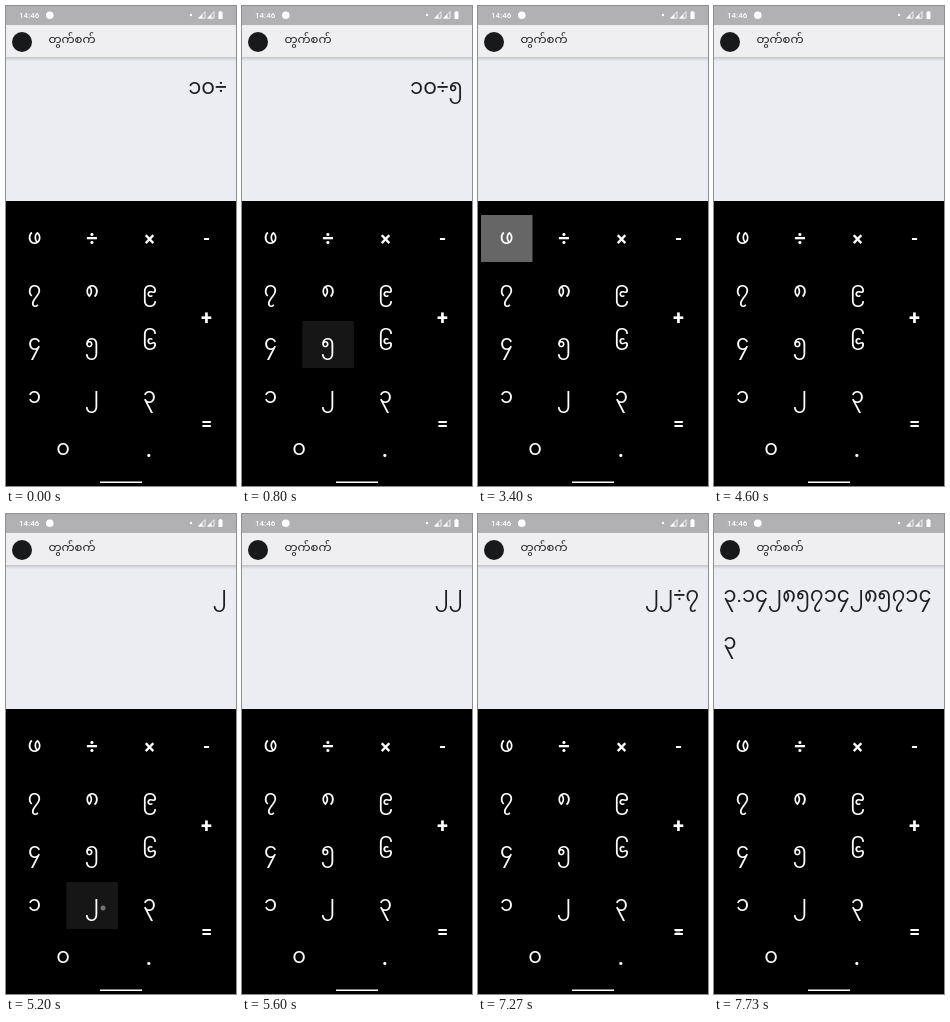
An HTML page with a canvas that plays this animation: 230x480 px, repeating every 8 s.

```html
<!DOCTYPE html>
<html lang="my">
<head>
<meta charset="utf-8">
<title>တွက်စက်</title>
<style>
html, body { margin: 0; width: 100%; height: 100%; overflow: hidden; background: #000; }
canvas { display: block; width: 230px; height: 480px; }
</style>
</head>
<body>
<canvas></canvas>
<script>
const LOOP = 8000, RATE = 15;
const FONTS = 'Roboto, "Noto Sans Myanmar", "Noto Sans", sans-serif';
const INK = '#1d1e21';
const TITLE = 'တွက်စက်', RESULT = '၃.၁၄၂၈၅၇၁၄၂၈၅၇၁၄';
const canvas = document.querySelector('canvas');
const ctx = canvas.getContext('2d');
const dpr = window.devicePixelRatio || 1;
canvas.width = 230 * dpr;
canvas.height = 480 * dpr;

function sizeFor(text, width) {
  ctx.font = `100px ${FONTS}`;
  return 100 * width / ctx.measureText(text).width;
}
// The longest result fills one line; the keys share its size.
const digitSize = sizeFor(RESULT, 208);
const titleSize = sizeFor(TITLE, 47);

function label(text, x, y, size, weight, color, align = 'center') {
  ctx.font = `${weight} ${size}px ${FONTS}`;
  ctx.textAlign = align;
  ctx.fillStyle = color;
  ctx.fillText(text, x, y);
}

// label, centre, baseline
const numerals = [
  ['ဖ', 28.5, 238], ['၇', 28.5, 291], ['၈', 86, 291], ['၉', 143.5, 291],
  ['၄', 28.5, 344], ['၅', 86, 344], ['၆', 143.5, 344],
  ['၁', 28.5, 396.5], ['၂', 86, 396.5], ['၃', 143.5, 396.5], ['၀', 57, 449]
];
// label, centre, baseline, weight
const operators = [
  ['÷', 86, 239, 700], ['×', 143.5, 239.5, 700], ['-', 200.5, 239, 500],
  ['+', 200.5, 318.3, 700], ['=', 200.5, 424.5, 500], ['.', 143, 451, 700]
];

const box = (col, row, height = 47) => [3 + 57.4 * col, 209 + 53 * row, 51.5, height];
const tap = [2.5, 40];
// start tick, button, touch point, radius per tick while held
const presses = [
  [9, box(1, 2), [88, 340], tap],
  [23, box(3, 3, 99), [200, 418], tap],
  [50, box(0, 0), [31, 234], tap],
  [75, box(1, 3), [95, 394], tap],
  [78, box(1, 3), [97, 394], tap],
  [85, box(1, 0), [88, 233], tap],
  [94, box(0, 1), [43, 285], [2.5, 14, 27, 37]],
  [109, box(3, 3, 99), [200, 418], tap]
];
const fade = [0.25, 0.087, 0.03];

const screens = [
  [0, '၁၀÷'], [10, '၁၀÷၅'], [24, '၂.၀'], [51, ''], [76, '၂'], [80, '၂၂'],
  [86, '၂၂÷'], [97, '၂၂÷၇'], [110, RESULT + '\n၃']
];

function readout(text) {
  const lines = text.split('\n');
  const [x, align] = lines.length > 1 ? [9.5, 'left'] : [221, 'right'];
  lines.forEach((line, row) => label(line, x, 88 + 46.5 * row, digitSize, 400, INK, align));
}

function ripple(tick, [start, rect, [x, y], radii]) {
  const age = tick - start, late = age - radii.length;
  if (age < 0 || late >= fade.length) return;
  ctx.save();
  ctx.beginPath();
  ctx.rect(...rect);
  ctx.clip();
  disc(`rgba(255,255,255,${late < 0 ? 0.4 : fade[late]})`, x, y, late < 0 ? radii[age] : 120);
  ctx.restore();
}

function fillRect(color, x, y, w, h) {
  ctx.fillStyle = color;
  ctx.fillRect(x, y, w, h);
}

function disc(color, x, y, r) {
  ctx.fillStyle = color;
  ctx.beginPath();
  ctx.arc(x, y, r, 0, 7);
  ctx.fill();
}

function signal(x) {
  ctx.lineWidth = 0.8;
  ctx.strokeStyle = ctx.fillStyle = '#fff';
  ctx.stroke(new Path2D(`M${x} 12.2h6.5v-6.5z`));
  ctx.fill(new Path2D(`M${x} 12.2h4v-4z`));
}

function header() {
  fillRect('#ecedf2', 0, 19, 230, 176);
  fillRect('#b1b1b4', 0, 0, 230, 19);
  label('14:46', 13, 12.2, 8, 500, '#fff', 'left');
  disc('#fff', 43.8, 9.2, 3.8);
  disc('#fff', 185, 9, 1.2);
  signal(192.5);
  signal(201.5);
  fillRect('#fff', 212.5, 6, 4, 7);
  fillRect('#fff', 213.5, 5, 2, 1);

  fillRect('#efeff2', 0, 19, 230, 32);
  const shadow = ctx.createLinearGradient(0, 51, 0, 55);
  shadow.addColorStop(0, '#c3c4c8');
  shadow.addColorStop(1, '#ecedf2');
  fillRect(shadow, 0, 51, 230, 4);
  disc('#17191b', 16, 36, 10);
  label(TITLE, 42.5, 37, titleSize, 500, INK, 'left');
}

function draw(time) {
  const tick = Math.floor((time % LOOP + 4) * RATE / 1000);
  ctx.setTransform(dpr, 0, 0, dpr, 0, 0);
  fillRect('#000', 0, 0, 230, 480);
  header();
  readout(screens.filter(([start]) => start <= tick).pop()[1]);
  presses.forEach(press => ripple(tick, press));
  numerals.forEach(([ch, x, y]) => label(ch, x, y, digitSize, 500, '#fff'));
  operators.forEach(([ch, x, y, weight]) => label(ch, x, y, 20, weight, '#fff'));
  fillRect('#fff', 94, 475.5, 42, 1.5);
}

const origin = performance.now();
function loop() {
  draw(performance.now() - origin);
  requestAnimationFrame(loop);
}
loop();
</script>
</body>
</html>
```
